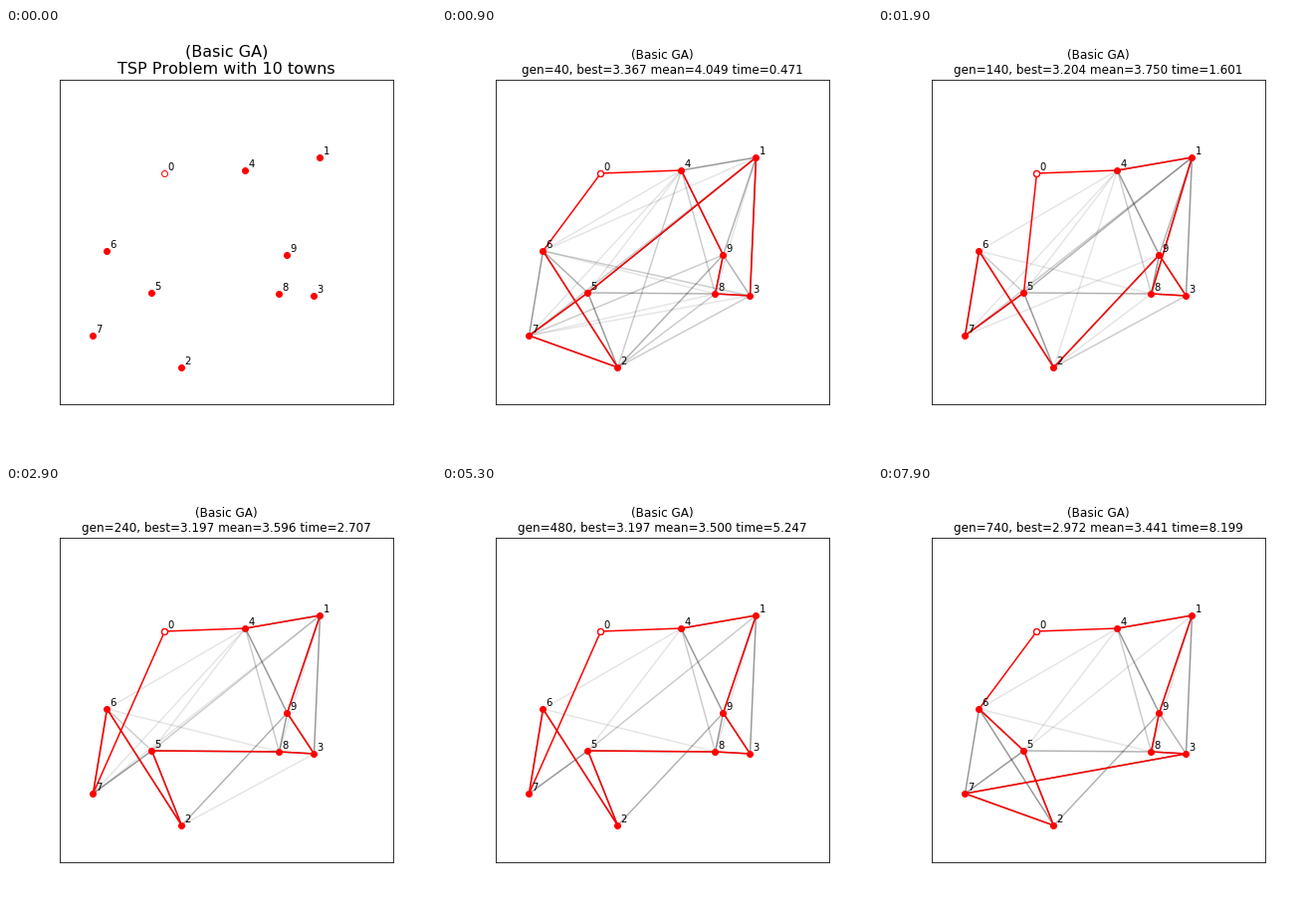
Write a matplotlib script that moves like this. It is 432x432 px and loops after 8 s.

```python
import numpy as np
import matplotlib.pyplot as plt
from itertools import combinations
from matplotlib.animation import FuncAnimation

STEP_MS = 100
FRAMES = 80
INTRO = 5          # frames before the first generation
GENS_PER_PLOT = 20

TOWNS = [(159, 146), (315, 130), (176, 341), (309, 269), (240, 143),
         (146, 266), (101, 224), (87, 309), (274, 267), (282, 228)]

# first generation, best length, best tour
BEST = [(0, 3.367, "0498315726"),
        (80, 3.204, "0418392675"),
        (180, 3.197, "0419385267"),
        (680, 2.972, "0419837256")]

# generation, mean length, elapsed time
STATS = np.array([(0, 5.212, 0.019), (40, 4.049, 0.471), (140, 3.750, 1.601),
                  (240, 3.596, 2.707), (480, 3.500, 5.247),
                  (640, 3.477, 6.995), (740, 3.441, 8.199)])

# pieces of tour in the population: towns, opacity, generation they die out
LASTING = np.inf
PIECES = [("26752", 0.42, LASTING), ("498", 0.38, LASTING),
          ("413", 0.40, LASTING), ("19385", 0.30, LASTING),
          ("29", 0.28, LASTING), ("48", 0.20, LASTING),
          ("18645", 0.12, LASTING), ("51", 0.30, 1000),
          ("65", 0.30, 500), ("32", 0.25, 550),
          ("97", 0.25, 220), ("428", 0.25, 220), ("63", 0.25, 130),
          ("74", 0.12, 700), ("87", 0.12, 200), ("61", 0.12, 100),
          ("73", 0.12, 100), ("71", 0.20, 600)]

EDGES = list(combinations(range(1, 10), 2))
NOISE = np.random.default_rng(4).uniform(0.1, 0.3, len(EDGES))


def edges_of(towns):
    nums = [int(c) for c in towns]
    return {tuple(sorted(p)) for p in zip(nums, nums[1:])}


def opacity(gen, tour):
    """Opacity of every population edge, in steps of a tenth."""
    level = dict(zip(EDGES, NOISE * max(0, 1 - gen / 40)))
    pieces = PIECES + [(tour, 0.5, LASTING)]
    for towns, strength, end in pieces:
        share = strength * max(0, 1 - gen / end)
        for edge in edges_of(towns):
            level[edge] = max(level.get(edge, 0), share)
    return [round(level[e], 1) for e in EDGES]


plt.rcParams["font.family"] = "DejaVu Sans"
plt.rcParams["text.kerning_factor"] = 6
fig = plt.figure(figsize=(6, 6), dpi=72, facecolor="white")
ax = fig.add_axes([0.125, 0.125, 0.775, 0.755])
ax.set(xlim=(54, 388.8), ylim=(378, 51.84), xticks=[], yticks=[])

pos = np.array(TOWNS) + (0.5, 0)
links = [ax.plot(*pos[[a, b]].T, "k-", lw=1.5, alpha=0, zorder=1)[0]
         for a, b in EDGES]
route, = ax.plot([], [], "-", color="red", lw=1.5, zorder=2)
ax.plot(*pos[1:].T, "ro", ms=6, zorder=2.5)
ring = dict(marker="o", ms=6, mfc="white", mec="red", zorder=2.5)
ax.plot(*pos[:1].T, **ring)
bold_ring, = ax.plot(*pos[:1].T, mew=1.3, **ring)
for i, (x, y) in enumerate(pos):
    ax.text(x + 3, y - 3, str(i), fontsize=10)
title = ax.set_title("", y=1.0, pad=6)


def draw(frame):
    running = frame >= INTRO
    for artist in (*links, route, bold_ring):
        artist.set_visible(running)
    title.set_fontsize(12 if running else 16)
    if not running:
        title.set_text("(Basic GA)\nTSP Problem with 10 towns")
        return

    gen = (frame - INTRO) // 2 * GENS_PER_PLOT
    _, best, tour = [b for b in BEST if b[0] <= gen][-1]
    route.set_data(*pos[[int(c) for c in tour + tour[0]]].T)
    for link, alpha in zip(links, opacity(gen, tour)):
        link.set_alpha(alpha)

    mean, time = (np.interp(gen, STATS[:, 0], STATS[:, k]) for k in (1, 2))
    title.set_text(f"(Basic GA)\ngen={gen}, best={best:.3f} "
                   f"mean={mean:.3f} time={time:.3f}")


anim = FuncAnimation(fig, draw, frames=FRAMES, interval=STEP_MS,
                     init_func=lambda: draw(0), repeat=True, repeat_delay=0)
plt.show()
```
